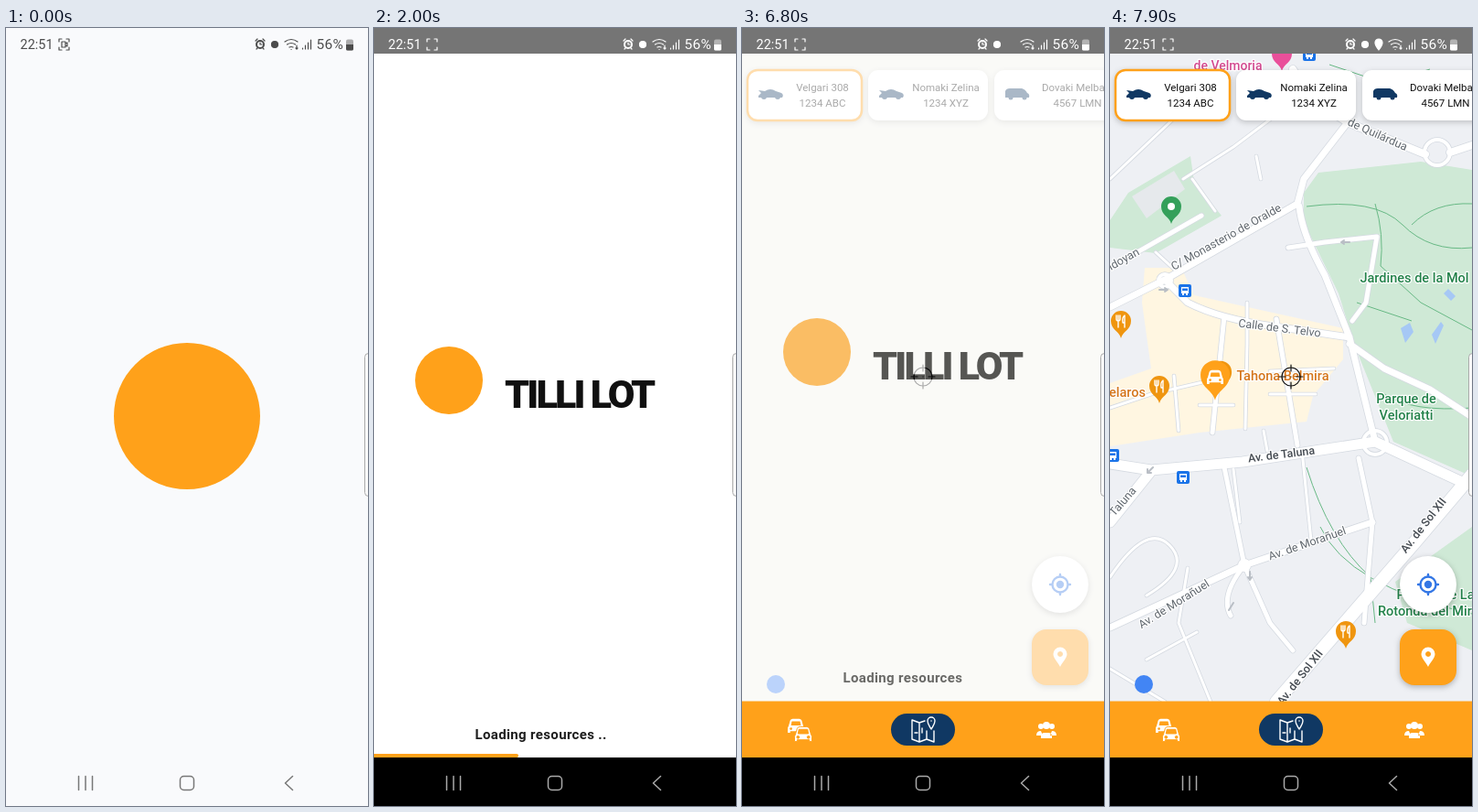
An HTML page that plays this animation: 396 px wide and 850 px high, repeating every 8000 ms.

```html
<!DOCTYPE html>
<html lang="en">
<head>
<meta charset="utf-8">
<title>Parking app start</title>
<style>
  html, body { margin: 0; width: 100%; height: 100%; overflow: hidden; }
  svg { display: block; width: 396px; height: 850px; font-family: Roboto, "Open Sans", sans-serif; }
  .line { fill: none; stroke: currentColor; stroke-linecap: round; stroke-linejoin: round; }
  .mid { text-anchor: middle; }
  .brand { font: 900 43px Roboto, sans-serif; letter-spacing: -2.8px; }
  .loading { font-weight: 700; font-size: 15px; letter-spacing: .35px; fill: #1e1e1e; }
  .card { fill: #fff; filter: drop-shadow(0 2px 3px #0003); }
  .fab { filter: drop-shadow(0 2px 3px #0004); }
  .label { paint-order: stroke; stroke: #fff; stroke-width: 2.5px; stroke-linejoin: round; fill: #5f666d; font-size: 12.5px; }
  .main { fill: #454b52; font-weight: 500; }
  .park { fill: #23824a; font-size: 14.5px; font-weight: 500; }
  .shop { fill: #d5761b; font-size: 14.5px; font-weight: 500; }
  .sight { fill: #d34b91; font-size: 14px; font-weight: 500; }
</style>
</head>
<body>
<svg viewBox="0 0 396 850">
  <defs>
    <clipPath id="view"><rect y="28" width="396" height="708"/></clipPath>
    <path id="pin" d="M0 17C-2 9-11 8-11-2A11 11 0 0 1 11-2C11 8 2 9 0 17Z"/>
    <g id="food">
      <use href="#pin" fill="#ef950f"/>
      <path d="M-5-8v4q0 2 2 2t2-2v-4M-3-8V5M4 5V-8q-3 2-2 8h2" class="line" color="#fff" stroke-width="1.4"/>
    </g>
    <g id="stop">
      <rect x="-7" y="-7" width="14" height="14" rx="2" fill="#1a73e8"/>
      <path d="M-4-4h8v7h-1v2h-2v-2h-2v2h-2v-2h-1Z" fill="#fff"/>
      <path d="M-3-2.500h6v2.500h-6Z" fill="#1a73e8"/>
    </g>
    <g id="coupe">
      <path d="M-13 2L-10-1L-13-4L-6-3Q0-7 6-3L12-1Q15 1 13 4H-13Z"/>
      <circle cx="-7" cy="3" r="3"/><circle cx="8" cy="3" r="3"/>
    </g>
    <g id="van">
      <path d="M-13 4V-3Q-12-6-8-6H5Q9-5 11-1Q14 0 13 4Z"/>
      <circle cx="-7" cy="4" r="2.500"/><circle cx="8" cy="4" r="2.500"/>
    </g>
    <g id="front">
      <path d="M-9 1L-7-6Q-6-8-4-8H4Q6-8 7-6L9 1Q10 2 10 4V9H7V7H-7V9H-10V4Q-10 2-9 1Z"/>
      <path d="M-6 0L-5-5H5L6 0Z" fill="#ffa11a"/>
      <circle cx="-6" cy="4" r="1.500" fill="#ffa11a"/><circle cx="6" cy="4" r="1.500" fill="#ffa11a"/>
    </g>
  </defs>

  <rect id="back" width="396" height="850"/>
  <circle id="mark" fill="#ffa11a"/>
  <g id="splash">
    <text id="title" class="brand" x="143" y="415">TILLI LOT</text>
    <text id="loading" class="loading" x="110.500" y="776.500"></text>
    <path id="bar" fill="#ffa11a"/>
  </g>

  <g id="page" clip-path="url(#view)">
    <rect y="28" width="396" height="708" fill="#f2f2eb"/>
    <g id="map">
      <rect y="28" width="396" height="708" fill="#eef0f4"/>
      <path fill="#fff6e1" d="M38 262H78L92 292L255 328V362L222 402L215 430L98 442L0 457V388L45 372L35 300Z"/>
      <path fill="#cfe9d6" d="M212 180L228 158L340 146L396 155V490L310 452L268 348L250 290L212 212ZM20 180L88 140L92 168L122 205L50 246L0 240V210ZM312 605L396 545V680L325 650Z"/>
      <path fill="#e6e9ec" d="M24 184L70 156L82 176L40 208Z"/>
      <path fill="#a6c8f5" d="M318 328l10-6 4 10-9 12ZM352 335l10-14 3 4-9 20ZM365 290l5-5 8 8-5 5Z"/>
      <path fill="none" stroke="#68b985" d="M215 195Q290 185 320 215T396 240M290 192Q300 225 296 260L340 300L396 330M330 215Q355 190 396 192M215 480Q240 560 285 600L290 650M230 545Q260 610 396 640M300 400Q330 420 396 415M240 40L300 60L350 45M270 300L330 320"/>
      <g id="roads"></g>
      <path class="line" color="#b9bec5" stroke-width="2" d="M262 234h-9l3-2m-3 2l3 2M54 286h9l-3-2m3 2l-3 2M47 480l-6 6v-4m0 4h4M153 594v9l-2-3m2 3l2-3M130 636l5-8"/>
      <use href="#stop" x="82" y="287"/><use href="#stop" x="80" y="491"/>
      <use href="#stop" x="3" y="467"/><use href="#stop" x="218" y="29"/>
      <use href="#pin" x="188" y="30" fill="#e94f9a"/>
      <use href="#pin" x="67" y="197" fill="#34a05a"/><circle cx="67" cy="195" r="4" fill="#fff"/>
      <use href="#food" x="12" y="322"/><use href="#food" x="54" y="393"/><use href="#food" x="258" y="661"/>
      <g id="labels"></g>
      <use href="#pin" transform="translate(121 378) scale(1.100)" fill="#ef950f"/>
      <use href="#pin" transform="translate(115 382) scale(1.450)" fill="#ffa11a"/>
      <use href="#front" transform="translate(115 381) scale(.9)" fill="#fff"/>
    </g>
    <circle cx="37" cy="717" r="10" fill="#4285f4"/>
    <g class="line" color="#111" stroke-width="1.200">
      <circle cx="198" cy="381" r="10"/>
      <path d="M185 381h7M204 381h7M198 368v7M198 387v7M198 381h.1"/>
    </g>
    <g id="cards"></g>
    <circle class="fab" cx="348" cy="608" r="31" fill="#fff"/>
    <g class="line" color="#3477e5" stroke-width="2.400">
      <circle cx="348" cy="608" r="8.500"/>
      <path d="M348 597v2M348 617v2M337 608h2M357 608h2"/>
      <circle cx="348" cy="608" r="3" fill="#3477e5"/>
    </g>
    <rect class="fab" x="317" y="657" width="62" height="61" rx="16" fill="#ffa11a"/>
    <path fill="#fff" fill-rule="evenodd" d="M348 698C346 693 340.500 689 340.500 684A7.500 7.500 0 0 1 355.500 684C355.500 689 350 693 348 698ZM348 681a3 3 0 1 0 .1 0Z"/>
  </g>

  <g id="tabs">
    <rect y="735.500" width="396" height="62" fill="#ffa11a"/>
    <rect x="163" y="749" width="70" height="35" rx="17.500" fill="#103863"/>
    <g fill="#fff">
      <use href="#front" transform="translate(59 762) scale(.9)"/>
      <use href="#front" transform="translate(67 771) scale(.95)" stroke="#ffa11a"/>
      <circle cx="327" cy="763" r="3"/><circle cx="339" cy="763" r="3"/><circle cx="333" cy="762" r="4"/>
      <path d="M322 773q0-5 5-5l2 5ZM344 773q0-5-5-5l-2 5ZM327 776v-2q0-4 4-4h4q4 0 4 4v2Z"/>
    </g>
    <g class="line" color="#fff" stroke-width="1.400">
      <path d="M200 757L194 759L186 756V777L194 780L202 777L210 780V768M194 759V780M202 768V777M189 770h3M197 765v5"/>
      <path d="M207 766Q203 760 203 757a4 4 0 0 1 8 0Q211 760 207 766ZM207 757h.1"/>
    </g>
  </g>

  <rect id="status" width="396" height="28" fill="#757575"/>
  <g id="icons" fill="currentColor">
    <text x="15.500" y="23" font-size="14.500">22:51</text>
    <text x="339.500" y="23" font-size="15.500" letter-spacing=".3">56%</text>
    <g class="line" stroke-width="1.200">
      <path d="M58 15v-3h3M66 12h3v3M69 21v3h-3M61 24h-3v-3"/>
      <path id="record" d="M61 15h4v6h-4ZM65 17l2-1v4l-2-1"/>
      <g id="left">
        <circle cx="278" cy="18" r="4" stroke-width="2"/><path d="M273 14l2-2M281 12l2 2M278 16v2h2M274 23l1-1M282 23l-1-1"/>
        <circle cx="294" cy="18" r="3.500" fill="currentColor"/>
      </g>
      <path id="place" fill="currentColor" d="M294 24Q290 19 290 16a4 4 0 0 1 8 0Q298 19 294 24Z"/>
      <path d="M305 15q7-5 14 0M307.500 18q4.500-3 9 0M310 21q2-1 4 0M312 23.500h.1M318 19v4l-1-1m1 1l1-1M324.500 23v-1M327.500 23v-4M330.500 23v-7M333.500 23v-10"/>
    </g>
    <rect x="372" y="12.500" width="8" height="12" rx="2" opacity=".45"/>
    <path d="M372 18h8v5q0 1.500-1.500 1.500h-5q-1.500 0-1.500-1.500Z"/>
  </g>
  <rect id="dock" y="797" width="396" height="53"/>
  <g id="keys" class="line" stroke-width="1.500">
    <path d="M79.500 817.500v15M87 817.500v15M94.500 817.500v15M313.500 817.500l-8 7.500 8 7.500"/>
    <rect x="190.500" y="817.500" width="15" height="15" rx="4"/>
  </g>
  <rect x="392.500" y="355.500" width="12" height="156" rx="4" fill="#fafafa" stroke="#aaa"/>
</svg>
<script>
const $ = id => document.getElementById(id);
const set = (id, attrs) => { for (const k in attrs) $(id).setAttribute(k, attrs[k]); };
const ramp = (t, from, to) => Math.min(1, Math.max(0, (t - from) / (to - from)));
const easeInOut = u => u < .5 ? 4 * u ** 3 : 1 - 4 * (1 - u) ** 3;

// Streets: width and route
const roads = [
  [3, 'M90 165L115 200M0 165L95 75M80 165L135 130L215 70M160 140L165 165M50 245L75 268M0 415L45 400L110 385M98 412H135M150 300V345L148 438M70 380L75 440M175 375L245 372M175 400H225M168 440L172 462'],
  [3, 'M135 482L142 540M210 462L220 560M0 600Q40 540 65 565T40 620M40 690L95 660M85 590L75 650L110 736M0 700L60 736'],
  [5, 'M0 262L100 205M125 315L112 442M182 318L205 456M125 480L147 587M147 587Q120 620 132 642M195 240L235 234L292 228L280 300L265 320M272 470L287 540L278 650M147 587L175 650L200 680'],
  [7, 'M0 305L60 275L205 192L212 165L260 103M60 275L85 300Q120 318 180 326L262 338M0 655L147 587L287 540M207 195Q210 225 235 270L262 338L290 452M262 345L300 372L350 395L396 425'],
  [8, 'M200 45Q225 85 262 104L345 138M372 136L396 128'],
  [11, 'M0 540L45 484M0 476L45 483L145 474L290 452L385 496'],
  [14, 'M396 488L335 560L182 736'],
  [4, 'M344 136a14 14 0 1 0 28 0a14 14 0 1 0-28 0M53 276a7 7 0 1 0 14 0a7 7 0 1 0-14 0M277 453a13 13 0 1 0 26 0a13 13 0 1 0-26 0M142 587a5 5 0 1 0 10 0a5 5 0 1 0-10 0']
];
const pass = (color, extra) => roads.map(([w, d]) =>
  `<path class="line" color="${color}" stroke-width="${w + extra}" d="${d}"/>`).join('');
$('roads').innerHTML = pass('#d5dae1', 1.6) + pass('#fff', 0);

// Labels: text, centre, angle, style
$('labels').innerHTML = [
  ['de Velmoria', 129, 46, 0, 'sight'],
  ['de Quilárdua', 291, 120, 24, ''],
  ['C/ Monasterio de Oralde', 129, 232, -29, ''],
  ['ldoyan', 17, 256, -29, ''],
  ['Calle de S. Telvo', 185, 332, 7, ''],
  ['Av. de Taluna', 188, 470, -7, 'main'],
  ['Taluna', 17, 520, -49, ''],
  ['Av. de Morañuel', 217, 567, -19, ''],
  ['Av. de Morañuel', 72, 633, -32, ''],
  ['Av. de Sol XII', 346, 546, -52, 'main'],
  ['Av. de Sol XII', 211, 712, -52, 'main'],
  ['Jardines de la Mol', 333, 278, 0, 'park'],
  ['Parque de', 324, 410, 0, 'park'],
  ['Veloriatti', 324, 428, 0, 'park'],
  ['Parque de La', 356, 624, 0, 'park'],
  ['Rotonda del Mirt', 347, 642, 0, 'park'],
  ['Tahona Belmira', 189, 385, 0, 'shop'],
  ['elaros', 19, 403, 0, 'shop']
].map(([text, x, y, angle, style]) =>
  `<text class="label mid ${style}" transform="translate(${x} ${y}) rotate(${angle})">${text}</text>`).join('');

$('cards').innerHTML = [
  [5, 127, 'Velgari 308', '1234 ABC', 'coupe', 88],
  [137, 133, 'Nomaki Zelina', '1234 XYZ', 'coupe', 223],
  [275, 140, 'Dovaki Melba 4', '4567 LMN', 'van', 367]
].map(([x, w, name, plate, car, mid], i) => `
  <rect class="card" x="${x + 1}" y="46" width="${w - 2}" height="55" rx="11" ${i ? '' : 'stroke="#ffa11a" stroke-width="2.5"'}/>
  <use href="#${car}" x="${x + 26}" y="72" fill="#103863"/>
  <text class="mid" font-size="11.500" fill="#111"><tspan x="${mid}" y="69">${name}</tspan><tspan x="${mid}" y="86">${plate}</tspan></text>`).join('');

function draw(t) {
  const launch = t < 520, home = t >= 6600;
  const lift = home ? 31 : 0;

  set('back', { fill: launch ? '#f9fafc' : '#fff' });
  set('status', { opacity: launch ? 0 : 1 });
  set('icons', { color: launch ? '#4c4c4c' : '#fff' });
  set('dock', { opacity: launch ? 0 : 1 });
  set('keys', { color: launch ? '#777' : '#aaa' });
  set('record', { opacity: t < 1500 || t >= 4500 && t < 6600 ? 1 : 0 });
  set('left', { transform: `translate(${home ? -15 : 0})` });
  set('place', { opacity: t >= 7400 ? 1 : 0 });

  set('mark', launch ? { cx: 198, cy: 424, r: 80, opacity: 1 } : {
    cx: 198 - 116 * easeInOut(ramp(t, 520, 1500)), cy: 385 - lift, r: 37,
    opacity: ramp(t, 520, 960)
  });

  set('splash', { opacity: launch ? 0 : 1 });
  set('title', { opacity: ramp(t, 1300, 2050), transform: `translate(0 ${-lift})` });
  const dots = Math.max(0, Math.floor((t - 520) / 510)) % 4;
  $('loading').textContent = 'Loading resources ' + '.'.repeat(dots);
  set('loading', { opacity: ramp(t, 520, 1030), transform: `translate(0 ${-2 * lift})` });
  const width = Math.min(361, Math.max(0, (t - 510) * .106)) + 35 * ramp(t, 6400, 6600);
  set('bar', { d: `M0 793H${Math.max(0, width - 2)}q2 0 2 2t-2 2H0Z`, opacity: home ? 0 : 1 });

  set('page', { opacity: ramp(t, 6600, 7170) });
  set('tabs', { opacity: home ? 1 : 0 });
  set('map', { opacity: ramp(t, 7350, 7650) });
}

const start = performance.now();
function tick() {
  draw((performance.now() - start) % 8000);
  requestAnimationFrame(tick);
}
tick();
</script>
</body>
</html>
```
